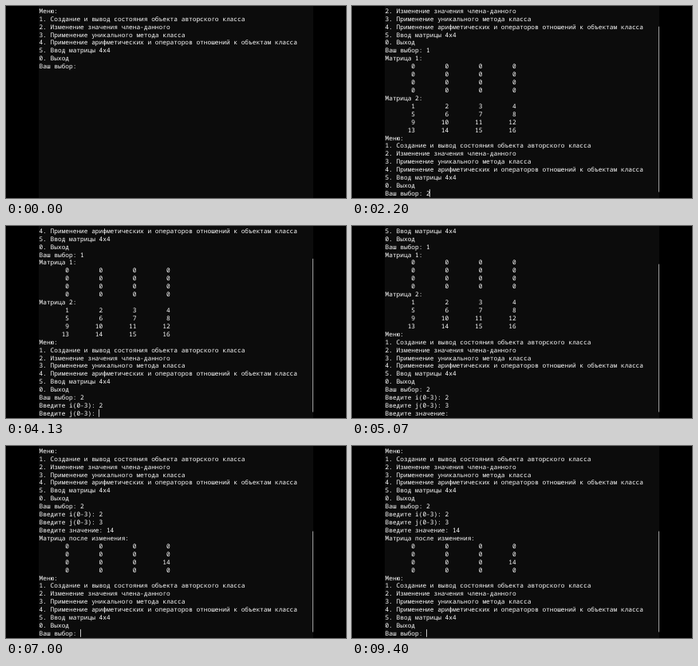
An HTML page that plays this animation: 426 px wide and 240 px high, repeating every 9470 ms.

```html
<!DOCTYPE html>
<html lang="ru">
<head>
<meta charset="utf-8">
<style>
html, body { margin: 0; width: 100%; height: 100%; overflow: hidden; background: #000; }
svg { display: block; width: 100vw; height: 100vh; }
text {
  font: 500 7.825px "Noto Sans Mono", "DejaVu Sans Mono", monospace;
  font-variant-ligatures: none;
  fill: #fff;
  white-space: pre;
  text-rendering: geometricPrecision;
}
</style>
</head>
<body>
<svg viewBox="0 0 426 240">
  <rect width="426" height="240" fill="#000"/>
  <rect x="41" width="344" height="240" fill="#0c0c0c"/>
  <g id="rows"></g>
  <rect id="cursor" width="1" height="9.6" fill="#c4c4c4"/>
  <rect id="thumb" x="384" width="1" fill="#a0a0a0"/>
</svg>
<script>
const LOOP = 9470, ROWS = 24, LEFT = 41.5, CHAR = 4.695, LINE = 9.92, BASE = 8.8, BLINK = 900;
const el = id => document.getElementById(id);

const menu = `Меню:
1. Создание и вывод состояния объекта авторского класса
2. Изменение значения члена-данного
3. Применение уникального метода класса
4. Применение арифметических и операторов отношений к объектам класса
5. Ввод матрицы 4x4
0. Выход
Ваш выбор: `;

// Four rows of right-aligned cells
function matrix(cell) {
  let out = "";
  for (let i = 0; i < 4; i++) {
    for (let j = 0; j < 4; j++) out += String(cell(i, j)).padStart(8) + " ";
    out += "\n";
  }
  return out;
}

// [time, text appended to the terminal]
const events = [
  [-500, menu],
  [700, "1"],
  [900, "\nМатрица 1:\n" + matrix(() => 0) +
        "Матрица 2:\n" + matrix((i, j) => i * 4 + j + 1) + menu],
  [2050, "2"],
  [2250, "\nВведите i(0-3): "],
  [2700, "2"],
  [2900, "\nВведите j(0-3): "],
  [4300, "3"],
  [4500, "\nВведите значение: "],
  [6150, "1"],
  [6350, "4"],
  [6630, "\nМатрица после изменения:\n" +
         matrix((i, j) => i === 2 && j === 3 ? 14 : 0) + menu]
];

const rows = Array.from({ length: ROWS }, (_, i) => {
  const row = document.createElementNS("http://www.w3.org/2000/svg", "text");
  row.setAttribute("x", LEFT);
  row.setAttribute("y", BASE + i * LINE);
  el("rows").append(row);
  return row;
});

function draw(t) {
  const past = events.filter(e => e[0] <= t);
  const lines = past.map(e => e[1]).join("").split("\n");
  const top = Math.max(0, lines.length - ROWS);
  rows.forEach((row, i) => {
    const s = lines[top + i] || "";
    if (row.textContent !== s) row.textContent = s;
  });

  const cursor = el("cursor"), last = lines.length - 1;
  const phase = (t - past[past.length - 1][0]) % BLINK;
  cursor.setAttribute("x", Math.floor(LEFT + lines[last].length * CHAR));
  cursor.setAttribute("y", 1 + (last - top) * LINE);
  cursor.setAttribute("visibility", phase < BLINK / 2 ? "visible" : "hidden");

  const thumb = el("thumb"), y = 8 + 230 * top / lines.length;
  thumb.setAttribute("y", y);
  thumb.setAttribute("height", 232.5 - y);
  thumb.setAttribute("visibility", top ? "visible" : "hidden");
}

const start = performance.now();
function tick() {
  draw((performance.now() - start) % LOOP);
  requestAnimationFrame(tick);
}
tick();
</script>
</body>
</html>
```
